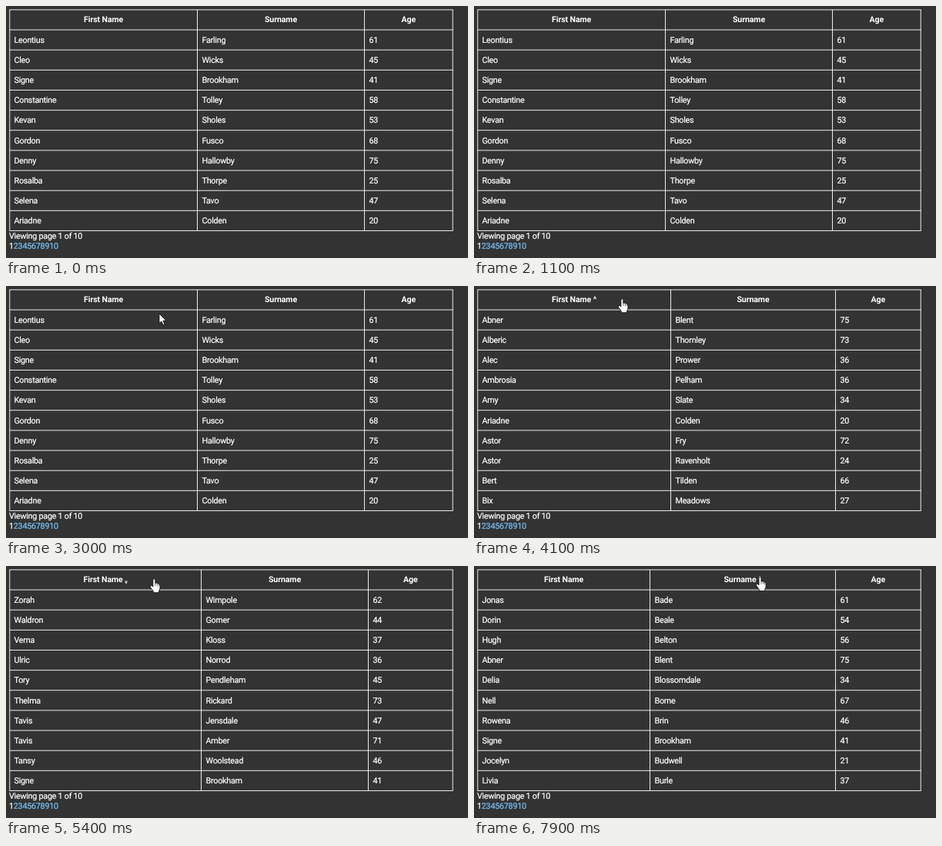
An HTML page for the animation above (8 s loop, 600 px wide and 328 px high).

```html
<!DOCTYPE html>
<html lang="en">
<head>
<meta charset="utf-8">
<title>Sortable table</title>
<style>
  html, body { margin: 0; width: 100%; height: 100%; overflow: hidden; background: #333; }
  svg { display: block; width: 600px; height: 328px; }
  text {
    font: 10.8px Roboto, Arial, sans-serif; letter-spacing: -.27px; white-space: pre;
    color: #fff; fill: currentColor; stroke: currentColor; stroke-width: .22;
    text-rendering: geometricPrecision;
  }
  .head { font-size: 10.6px; font-weight: 700; letter-spacing: -.1px; text-anchor: middle; stroke: none; }
  .small { font-size: 7.2px; }
  .link { color: #78c2fa; fill: currentColor; stroke: currentColor; }
  .grid { stroke: #ececec; fill: none; }
  .cursor { fill: #fff; stroke: #111; stroke-width: .9; stroke-linejoin: round; }
</style>
</head>
<body>
<svg viewBox="0 0 600 328">
  <g id="table"></g>
  <text x="4" y="303.1">Viewing page 1 of 10</text>
  <text x="4" y="316.2">1<tspan class="link">2345678910</tspan></text>
  <path id="arrow" class="cursor" d="M0 0V12.6L2.9 9.9 4.9 14.6 7 13.7 5 9.1H9Z"/>
  <g id="hand" class="cursor">
    <path d="M-1.5 10.5V1.4Q0-.8 1.5 1.4V6Q3 4.8 4 6.4 5.3 5.6 6 7.1 7.6 6.8 7.6 8.6V12.5Q7.4 14.6 6.2 16V18.3H-1.2V16.3L-4.9 11.2Q-5.4 9.2-3.6 8.9Z"/>
    <path d="M1.5 6V9.5M4 6.4V9.7M6 7.1V10" stroke-width=".6"/>
  </g>
</svg>
<script>
const LOOP = 8000, STEP = 100, TOP = 4.9, ROW = 26.145, LEFT = 4.8, RIGHT = 580.2;
const UP = " ^", DOWN = ' <tspan class="small" dy="1.2">v</tspan>';

// at: start time, cols: inner column borders, mark: sort sign per header
const views = [
  { at: 0, cols: [248.5, 465.5], mark: [], rows: `Leontius Farling 61,Cleo Wicks 45,Signe Brookham 41,
    Constantine Tolley 58,Kevan Sholes 53,Gordon Fusco 68,Denny Hallowby 75,Rosalba Thorpe 25,
    Selena Tavo 47,Ariadne Colden 20` },
  { at: 4100, cols: [255.5, 469.5], mark: [UP], rows: `Abner Blent 75,Alberic Thornley 73,Alec Prower 36,
    Ambrosia Pelham 36,Amy Slate 34,Ariadne Colden 20,Astor Fry 72,Astor Ravenholt 24,
    Bert Tilden 66,Bix Meadows 27` },
  { at: 5000, cols: [253.5, 470.5], mark: [DOWN], rows: `Zorah Wimpole 62,Waldron Gorner 44,Verna Kloss 37,
    Ulric Norrod 36,Tory Pendleham 45,Thelma Rickard 73,Tavis Jensdale 47,Tavis Amber 71,
    Tansy Woolstead 46,Signe Brookham 41` },
  { at: 7900, cols: [228.5, 469.5], mark: ["", UP], rows: `Jonas Bade 61,Dorin Beale 54,Hugh Belton 56,
    Abner Blent 75,Delia Blossomdale 34,Nell Borne 67,Rowena Brin 46,Signe Brookham 41,
    Jocelyn Budwell 21,Livia Burle 37` },
];

// Cursor stops: time, x, y; it is out of the stage between the two paths
const sweep = [[1600, 266, 2], [1800, 170, 326]];
const visit = [[2000, 190, 318], [2600, 199, 36], [3000, 199, 36], [3300, 192.4, 16.4],
               [6900, 192.4, 16.4], [7400, 371.5, 14.2]];

const $ = id => document.getElementById(id);
const text = (x, y, s, cls = "") => `<text class="${cls}" x="${x}" y="${y}">${s}</text>`;

function drawTable({ cols, mark, rows }) {
  const xs = [LEFT, ...cols, RIGHT], bottom = TOP + ROW * 11;
  let grid = xs.map(x => `M${x} ${TOP}V${bottom}`).join("");
  for (let k = 0; k < 12; k++) grid += `M${LEFT - .5} ${TOP + ROW * k}H${RIGHT + .5}`;
  let out = `<path class="grid" d="${grid}"/>`;
  ["First Name", "Surname", "Age"].forEach((name, c) => {
    out += text((xs[c] + xs[c + 1]) / 2, 21.4, name + (mark[c] || ""), "head");
  });
  rows.split(",").forEach((row, r) => row.trim().split(" ").forEach((s, c) => {
    out += text([10.5, xs[1] + 6, xs[2] + 6][c], 47.9 + ROW * r, s);
  }));
  $("table").innerHTML = out;
}

function along(path, t) {
  const i = path.findIndex(p => p[0] > t);
  if (i < 0) return path.at(-1).slice(1);
  const [t0, x0, y0] = path[i - 1], [t1, x1, y1] = path[i];
  const u = (t - t0) / (t1 - t0), e = u * u * (3 - 2 * u);
  return [x0 + (x1 - x0) * e, y0 + (y1 - y0) * e];
}

function show(el, on, [x, y]) {
  el.setAttribute("visibility", on ? "visible" : "hidden");
  el.setAttribute("transform", `translate(${x} ${y})`);
}

let shown;
function frame() {
  const t = Math.floor(performance.now() % LOOP / STEP) * STEP;
  const view = views.findLast(v => v.at <= t);
  if (view !== shown) drawTable(shown = view);
  const inside = t >= 1600 && t < 1800 || t >= 2000;
  const pos = inside ? along(t < 2000 ? sweep : visit, t) : [0, 0];
  const onHeader = t > 3000 && pos[1] < 31;
  show($("arrow"), inside && !onHeader, pos);
  show($("hand"), onHeader, pos);
  requestAnimationFrame(frame);
}
frame();
</script>
</body>
</html>
```
